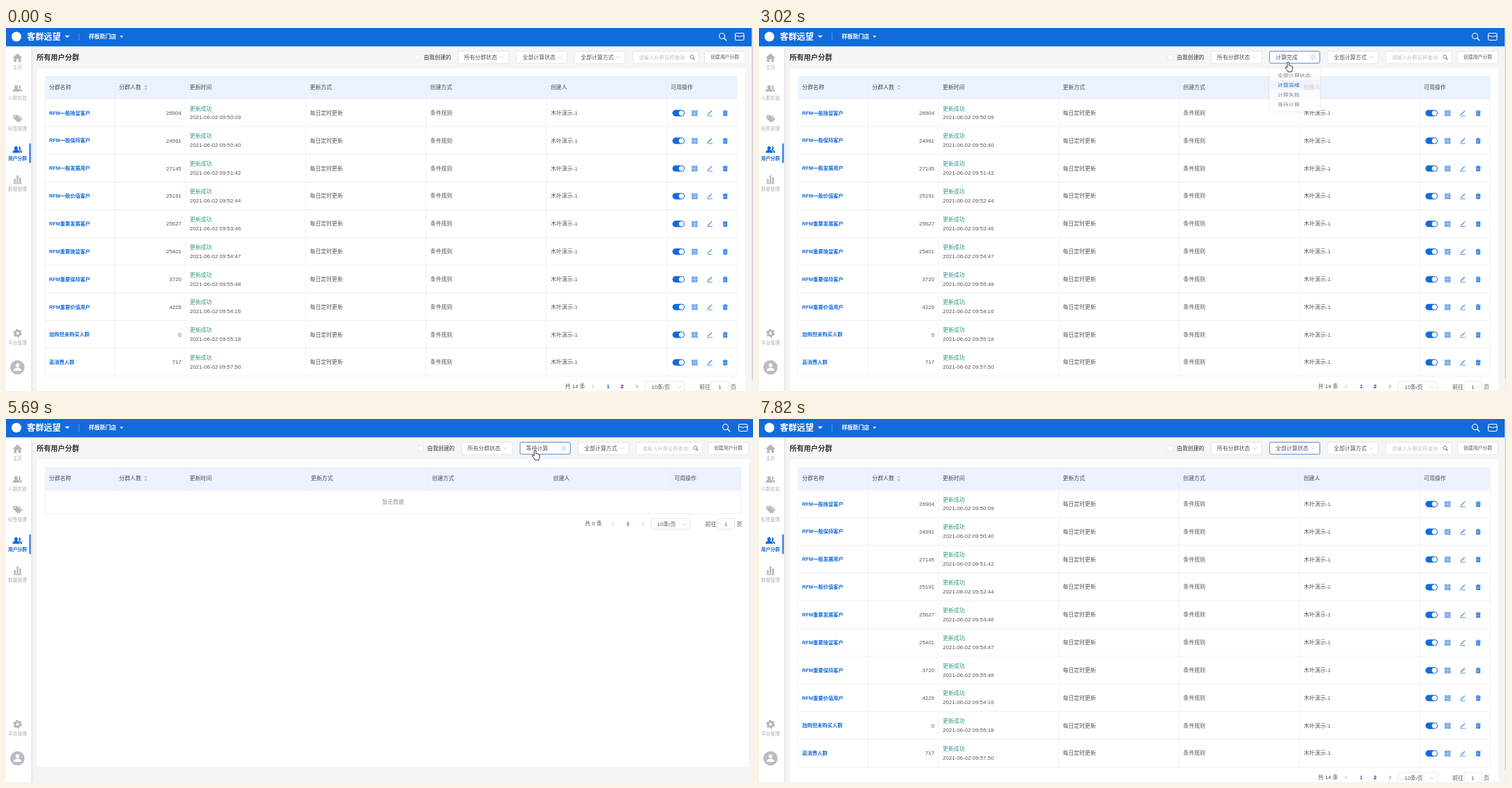
An HTML page for the animation above (7.86 s loop, 1073x522 px).

```html
<!DOCTYPE html>
<html lang="zh-CN">
<head>
<meta charset="utf-8">
<title>用户分群</title>
<style>
html, body { margin: 0; width: 100%; height: 100%; overflow: hidden; background: #f5f5f5; }
svg { display: block; width: 1073px; height: 522px; }
text { font: 7.9px "Liberation Sans", "Noto Sans CJK SC", "Noto Sans CJK", sans-serif; white-space: pre; }
.b { font-weight: 700; }
.line { fill: none; stroke-linecap: round; stroke-linejoin: round; }
</style>
</head>
<body>
<svg id="stage" viewBox="0 0 1073 522"></svg>
<script>
const LOOP = 7860, BLUE = '#126bdb', GREY = '#b4b7bc', INK = '#56585c';
const OPTIONS = ['全部计算状态', '计算完成', '计算失败', '等待计算'];

// Drawing helpers; text is placed by its vertical centre.
const text = (x, y, s, o = {}) => {
  const size = o.size || 7.9;
  return `<text x="${x}" y="${y + size * .36}" style="font-size:${size}px" fill="${o.fill || INK}"` +
    `${o.bold ? ' class="b"' : ''} text-anchor="${o.anchor || 'start'}">${s}</text>`;
};
const rect = (x, y, w, h, fill, more = '') =>
  `<rect x="${x}" y="${y}" width="${w}" height="${h}" fill="${fill}" ${more}/>`;
const box = (x, y, w, h) => rect(x, y, w, h, '#fff', 'stroke="#dfe2e8" stroke-width=".8" rx="2"');
const line = (d, color, w = .8) => `<path class="line" d="${d}" stroke="${color}" stroke-width="${w}"/>`;
const shape = (d, fill) => `<path d="${d}" fill="${fill}"/>`;
const at = (x, y, s) => `<g transform="translate(${x} ${y})">${s}</g>`;
const circle = (x, y, r, fill, more = '') => `<circle cx="${x}" cy="${y}" r="${r}" fill="${fill}" ${more}/>`;
const chevron = (x, y) => line(`M${x - 2.8} ${y - 1.4}l2.8 2.8 2.8-2.8`, '#b9bdc5', .7);
const lens = (x, y, r, color, w) =>
  circle(x, y, r, 'none', `stroke="${color}" stroke-width="${w}"`) +
  line(`M${x + r * .75} ${y + r * .75}l${r * .8} ${r * .8}`, color, w * 1.3);

const icons = {
  home: c => shape('M0-6.5L7 0H5V6H1.6V1.8H-1.6V6H-5V0H-7z', c),
  people: c => shape('M-2-5a2.6 2.8 0 0 1 1.4 5.1c2.6.8 4.2 1.8 4.2 4.4H-7c0-2.6 1.4-3.6 3.6-4.4A2.8 2.8 0 0 1-2-5z' +
    'M2-5a2.6 2.7 0 0 1 1.3 5C5.5.8 6.6 2 6.6 4.5H4.5C4.4 2.3 3.4.9 1.5 0 2.5-1.6 2.4-3.5 2-5z', c),
  tag: c => shape('M-6-5.5H-1L5 .5 .5 5.5-6-1z', c) + line('M1.5-5.2L6.3.2 2.6 4.5', c, 1.2) + circle(-3.6, -3.2, 1, '#fff'),
  bars: c => rect(-5, -1, 2.4, 6, c) + rect(-1.2, -6, 2.4, 11, c) + rect(2.6, -3, 2.4, 8, c) + rect(-6, 5.2, 12, 1.1, c),
  gear: c => circle(0, 0, 3.5, 'none', `stroke="${c}" stroke-width="3"`) +
    circle(0, 0, 5.4, 'none', `stroke="${c}" stroke-width="1.8" stroke-dasharray="2.83 2.83"`)
};

function topBar() {
  return rect(0, 0, 1073, 26.4, BLUE) + circle(15, 12.5, 7, '#fff') +
    text(30, 12.5, '客群远望', { size: 12.2, fill: '#fff', bold: 1 }) +
    shape('M84.5 10.8h7l-3.5 3.5z', '#fff') + rect(104.6, 7, .8, 11, '#6fa5e8') +
    text(119, 12.5, '样板新门店', { fill: '#fff', bold: 1 }) + shape('M163.5 11.3h5l-2.5 2.6z', '#fff');
}

function sideBar() {
  const items = [['home', 43, 57, '主页'], ['people', 87, 101, '人群实验'], ['tag', 130.5, 144.5, '标签管理'],
    ['people', 175, 188, '用户分群'], ['bars', 218, 232, '数据管理'], ['gear', 439, 453, '平台管理']];
  let s = rect(0, 26, 36, 496, '#fff', 'filter="url(#shade)"') + rect(33.5, 166, 2, 28, BLUE);
  for (const [icon, iy, ty, label] of items) {
    const on = label === '用户分群';
    s += at(16.5, iy, icons[icon](on ? BLUE : GREY)) +
      text(16.5, ty, label, { size: 6.8, fill: on ? BLUE : '#a9acb1', anchor: 'middle', bold: on });
  }
  return s + circle(16.5, 488, 10.3, '#b9bdc3') + circle(16.5, 485, 2.7, '#fff') +
    shape('M11 493c0-3 2.3-4.5 5.5-4.5s5.5 1.5 5.5 4.5z', '#fff');
}

// Everything here slides sideways with the page scrollbar.
function filters() {
  return lens(1028.5, 11.5, 4, '#fff', 1.1) +
    rect(1047.5, 7.5, 12.5, 10, 'none', 'rx="1.8" stroke="#fff" stroke-width="1.1"') +
    line('M1047.5 11.5h3.5q2.7 2.6 5.5 0h3.5', '#fff', 1) +
    rect(587, 38.5, 7.5, 7.5, '#fff', 'stroke="#dfe2e8" stroke-width=".8" rx="1"') +
    text(600, 42, '由我创建的', { fill: '#36383c' }) +
    box(649.5, 33.5, 72.5, 17.5) + text(658, 42, '所有分群状态') + chevron(712, 42) +
    '<rect id="frame" x="733.4" y="33.4" width="72.2" height="17.3" rx="2" fill="#fff" stroke-width=".75"/>' +
    '<g id="value"></g><g id="mark"></g>' +
    box(816.8, 33.5, 72.4, 17.5) + text(825.5, 42, '全部计算方式') + chevron(879.5, 42) +
    box(900.4, 33.5, 94.6, 17.5) + text(909, 42, '请输入分群名称查询', { size: 7.35, fill: '#bcc0c8' }) +
    lens(985.2, 41.4, 2.5, '#666', .8) +
    box(1003.5, 33.5, 58, 17.5) + text(1032.5, 42, '创建用户分群', { size: 6.85, anchor: 'middle' });
}

function tableHead(cols, right) {
  const names = ['分群名称', '分群人数', '更新时间', '更新方式', '创建方式', '创建人', '可用操作'];
  let s = rect(56, 69, right - 56, 33.5, '#eaf3fe');
  names.forEach((n, i) => s += text(cols[i] + 6, 85.5, n, { fill: '#484b50' }));
  cols.slice(1).forEach(x => s += rect(x, 69, .7, 33.5, '#e4edf8'));
  return s + shape('M198.3 84.5h5l-2.5-2.7zM198.3 86.5h5l-2.5 2.7z', '#b9bfc9');
}

function pager(x, y, total, pages) {
  let s = text(x, y, `共 ${total} 条`), next = x + 62;
  s += line(`M${x + 41} ${y - 2.2}l-2.2 2.2 2.2 2.2`, pages > 1 ? '#9a9da3' : '#bbb');
  for (let i = 1; i <= pages; i++, next += 20)
    s += text(next, y, i, { bold: 1, fill: i === 1 ? BLUE : '#303133', anchor: 'middle' });
  const k = next + 1.5;
  s += line(`M${k - 1} ${y - 2.2}l2.2 2.2-2.2 2.2`, pages > 1 ? '#555' : '#aaa');
  return s + box(k + 11.5, y - 7.5, 56, 15.5) + text(k + 20.5, y + .5, '10条/页') + chevron(k + 60, y + 1) +
    text(k + 89.5, y + .5, '前往') + box(k + 106.5, y - 7.5, 25, 15.5) +
    text(k + 119, y + .5, '1', { anchor: 'middle' }) + text(k + 134.5, y + .5, '页');
}

function actions(y) {
  const c = '#2c7bdf';
  let s = rect(957.3, y - 4.3, 17.6, 9.2, BLUE, 'rx="4.6"') + circle(970.2, y + .3, 3.6, '#fff');
  for (const dx of [-3.4, 1]) for (const dy of [-3, 1.4])
    s += rect(989 + dx, y + dy, 2.6, 2.6, 'none', `stroke="${c}" stroke-width="1"`);
  return s + line(`M1008.2 ${y + 2.4}l5.4-5`, c, 1.1) + line(`M1007.4 ${y + 4.2}h7`, c, .8) +
    line(`M1029.7 ${y - 2}h6.8M1031.8 ${y - 2}v-1.3h2.6v1.3`, c, .9) +
    rect(1030.2, y - 1.6, 5.8, 6, c, 'rx=".6"') +
    line(`M1032.1 ${y - .2}v2.8M1034.1 ${y - .2}v2.8`, '#fff', .6);
}

function fullView() {
  const cols = [56, 156.5, 257.8, 430.5, 603.3, 776.2, 949], right = 1050.5;
  const rows = [['RFM一般挽留客户', 26904, '50:09'], ['RFM一般保持客户', 24991, '50:40'],
    ['RFM一般发展用户', 27145, '51:42'], ['RFM一般价值客户', 25191, '52:44'],
    ['RFM重要发展客户', 25627, '53:46'], ['RFM重要挽留客户', 25401, '54:47'],
    ['RFM重要保持客户', 3720, '55:48'], ['RFM重要价值用户', 4229, '54:16'],
    ['加购但未购买人群', 0, '55:18'], ['高消费人群', 717, '57:50']];
  let s = rect(44.5, 58, 1017.5, 464, '#fff') + tableHead(cols, right);
  rows.forEach(([name, count, time], i) => {
    const y = 122 + i * 39.85;
    s += text(62, y, name, { size: 7.25, fill: BLUE, bold: 1 }) + text(252, y, count, { anchor: 'end' }) +
      text(264, y - 6.3, '更新成功', { fill: '#35998a' }) + text(264, y + 6.6, '2021-06-02 09:' + time) +
      text(436.5, y, '每日定时更新') + text(609.5, y, '条件规则') + text(782.5, y, '木叶演示-1') +
      actions(y) + rect(56, y + 19.5, right - 56, .7, '#e6eaf1');
  });
  for (const x of [...cols, right]) s += rect(x - .3, 102.5, .7, 398.5, '#e9edf3');
  return s + pager(803, 515.5, 14, 2) + rect(1071, 0, 2, 522, '#f1f1f1') + rect(1071, 0, 2, 505, '#d6d8dc');
}

function emptyView() {
  return rect(44.5, 58, 1022.5, 442, '#fff') +
    tableHead([56, 156.5, 257.8, 432, 606, 780, 954], 1056) +
    rect(56, 102.5, 999.7, 33.5, 'none', 'stroke="#e9edf3" stroke-width=".8"') +
    text(556, 119.5, '暂无数据', { fill: '#909399', anchor: 'middle' }) + pager(831.5, 150.5, 0, 1);
}

const HAND = 'M-1.3 1.2Q-1.2 0 0 0T1.3 1.2V5Q2.6 4.3 3.2 5.3 4.5 4.8 5 5.9 6.6 5.6 6.6 7.2V9.5' +
  'Q6.6 11.2 5.5 12.3V14H-.4V12.8Q-2.3 10.8-4 8.3C-4.6 7-3.2 6.3-2.3 7.2L-1.3 8.2z';
const ARROW = 'M0 0V11.5L2.6 9.2 4.4 13 6.2 12.2 4.5 8.5H8z';

const stage = document.getElementById('stage');
stage.innerHTML = `<defs><filter id="shade" x="-20%" y="-20%" width="140%" height="140%">
  <feDropShadow dx="0" dy="1" stdDeviation="2" flood-color="#000" flood-opacity=".14"/></filter></defs>` +
  rect(0, 0, 1073, 522, '#f5f5f5') + sideBar() + topBar() +
  text(44, 42, '所有用户分群', { size: 10.2, fill: '#303133', bold: 1 }) +
  `<g id="full">${fullView()}</g><g id="empty">${emptyView()}</g><g id="filters">${filters()}</g><g id="menu"></g>` +
  '<path id="cursor" fill="#fff" stroke="#222" stroke-width=".9" stroke-linejoin="round"/>';
const $ = id => document.getElementById(id);

// [from, to, x, y]: the pointer glides to x, y between the two times.
const START = [790, 526];
const MOVES = [[390, 1150, 758.5, 44.5], [1500, 1940, 762, 86], [2200, 2720, 760, 49], [3090, 3340, 763, 106],
  [3640, 4170, 759, 41], [4460, 4880, 764.5, 126], [5130, 5350, 760, 45], [5840, 6330, 768, 70]];
const OPENINGS = [[1400, 1990], [2950, 3490], [4350, 5110], [5700, 6390]];

const clamp = v => Math.max(0, Math.min(1, v));
const smooth = u => u * u * (3 - 2 * u);
const rest = u => (1 - clamp(u)) ** 5;

function pointer(t) {
  let [x, y] = START;
  for (const [from, to, mx, my] of MOVES) {
    const k = smooth(clamp((t - from) / (to - from)));
    x += (mx - x) * k;
    y += (my - y) * k;
  }
  return [x, y];
}

function put(id, html) {
  const el = $(id);
  if (el.last !== html) el.innerHTML = el.last = html;
}

function menu(chosen, hover) {
  let s = rect(.3, 0, 72.4, 83.5, '#fff', 'rx="2" filter="url(#shade)"') +
    shape('M24.5.3l3.5-3.3 3.5 3.3z', '#fff');
  OPTIONS.forEach((label, i) => {
    if (i === hover) s += rect(.5, 3.7 + 19 * i, 72, 19, '#f4f6f9');
    s += text(12, 13.3 + 19 * i, label, i === chosen ? { fill: BLUE, bold: 1 } : {});
  });
  return s;
}

function draw(t) {
  const empty = t >= 3700 && t < 6750, shift = empty ? 5 : 0;
  const chosen = t < 1990 || t >= 6390 ? 0 : t < 3490 ? 1 : t < 5110 ? 2 : 3;
  const [x, y] = pointer(t);

  let scale = 0, open = false;
  for (const [from, to] of OPENINGS) {
    if (t < from) break;
    open = t < to;
    scale = open ? 1 - rest((t - from) / 300) : rest((t - to) / 300);
  }
  const onSelect = t >= 390 && y > 33 && y < 52;

  $('full').style.display = empty ? 'none' : '';
  $('empty').style.display = empty ? '' : 'none';
  $('filters').setAttribute('transform', `translate(${shift} 0)`);
  $('frame').setAttribute('stroke', t >= 1400 ? BLUE : onSelect ? '#c0c4cc' : '#dfe2e8');
  put('value', text(742, 42, OPTIONS[chosen]));
  put('mark', onSelect && chosen
    ? circle(796, 42, 3.2, 'none', 'stroke="#b9bdc5" stroke-width=".7"') +
      line('M794.8 40.8l2.4 2.4m0-2.4l-2.4 2.4', '#b9bdc5', .7)
    : open ? line('M793.2 43.4l2.8-2.8 2.8 2.8', '#b9bdc5', .7) : chevron(796, 42));

  const row = Math.floor((y - 61.7) / 19);
  put('menu', scale > .01 ? menu(chosen, row >= 0 && row < 4 ? row : chosen) : '');
  $('menu').setAttribute('transform', `translate(${733 + shift} 58) scale(1 ${scale})`);
  $('menu').setAttribute('opacity', scale);

  const cursor = $('cursor');
  cursor.style.display = t >= 390 && t < 7750 ? '' : 'none';
  cursor.setAttribute('d', onSelect || (open && y < 142) ? HAND : ARROW);
  cursor.setAttribute('transform', `translate(${x} ${y})`);
}

const began = performance.now();
function tick() {
  draw((performance.now() - began) % LOOP);
  requestAnimationFrame(tick);
}
tick();
</script>
</body>
</html>
```
